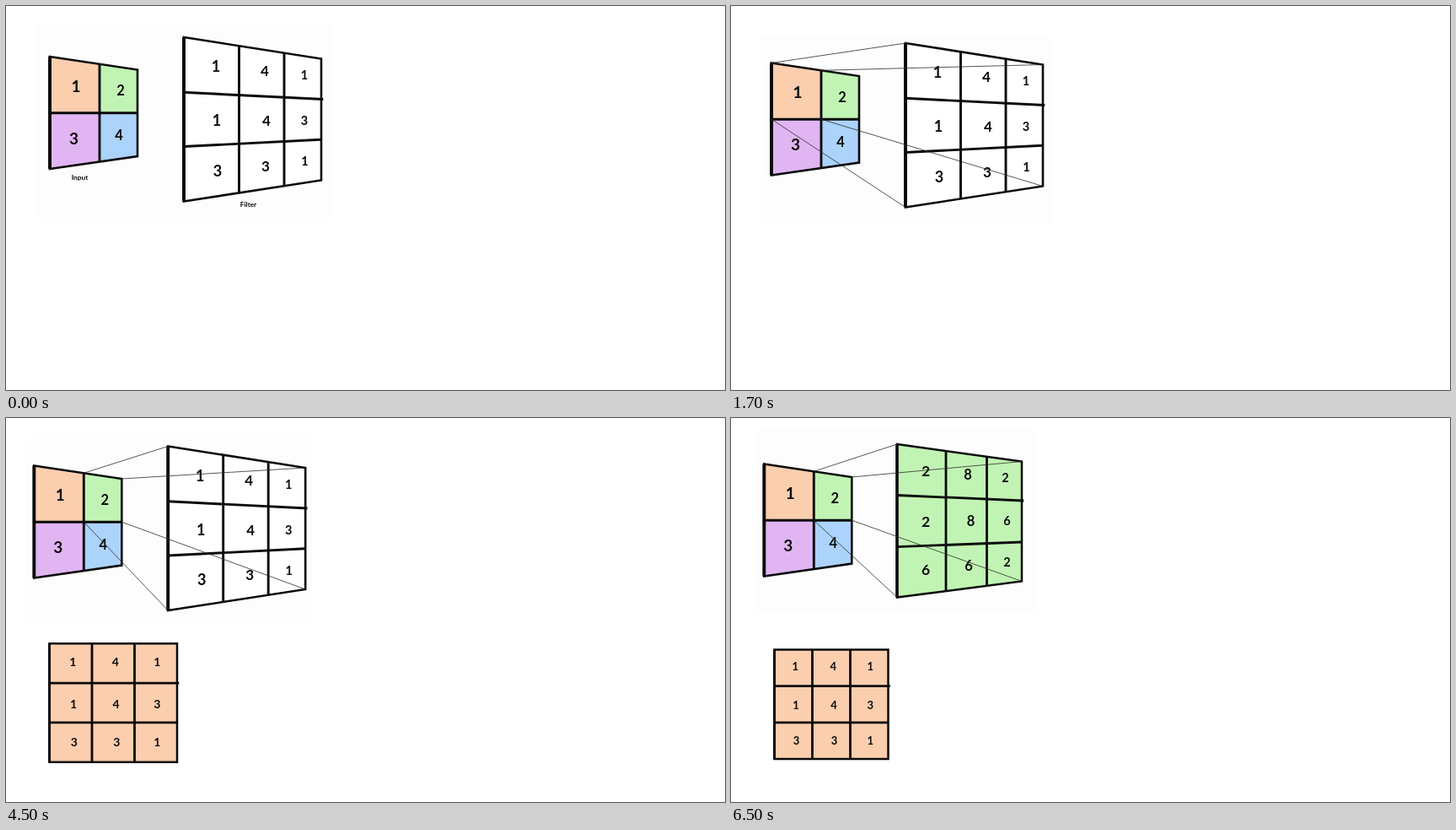
An HTML page that plays this animation: 853x455 px, repeating every 8 s.

```html
<!DOCTYPE html>
<html lang="en">
<head>
<meta charset="utf-8">
<title>Transposed convolution</title>
<style>
  html, body { margin: 0; width: 100%; height: 100%; overflow: hidden; background: #fff; }
  svg { display: block; }
  text { font-family: Lato, "Open Sans", sans-serif; font-weight: 700; text-anchor: middle; fill: #0b0b0b; }
  .edge { stroke: #0a0a0a; fill: none; stroke-miterlimit: 6; }
  .ray { stroke: #2c2c2c; stroke-width: .8; }
</style>
</head>
<body>
<svg id="stage" width="853" height="455" viewBox="0 0 853 455"></svg>
<script>
const NS = 'http://www.w3.org/2000/svg';
const stage = document.getElementById('stage');
const ORANGE = '#fbceae', GREEN = '#c1f4b4', PURPLE = '#e1b5f2', BLUE = '#acd3fc';
const LOOP = 8000;

function add(parent, tag, attrs, content) {
  const el = document.createElementNS(NS, tag);
  for (const key in attrs) el.setAttribute(key, attrs[key]);
  if (content !== undefined) el.textContent = content;
  parent.append(el);
  return el;
}

function line(g, a, b, width, cls = 'edge') {
  const attrs = { x1: a[0], y1: a[1], x2: b[0], y2: b[1], class: cls };
  if (width) attrs['stroke-width'] = width;
  add(g, 'line', attrs);
}

function label(g, x, y, size, content) {
  add(g, 'text', { x, y: y + size * .36, 'font-size': size }, content);
}

// x: column lines; left, right: heights of the row lines at both sides
function gridPoint(grid, col, row) {
  const { x, left, right } = grid;
  const k = (x[col] - x[0]) / (x[x.length - 1] - x[0]);
  return [x[col], left[row] + (right[row] - left[row]) * k];
}

function shift(grid, dx, dy) {
  return {
    ...grid,
    x: grid.x.map(v => v + dx),
    left: grid.left.map(v => v + dy),
    right: grid.right.map(v => v + dy),
    spots: grid.spots.map(([x, y]) => [x + dx, y + dy])
  };
}

function drawGrid(g, grid, digits, fills) {
  const n = grid.x.length - 1;
  const at = (c, r) => gridPoint(grid, c, r);
  const w = grid.weight;
  for (let r = 0; r < n; r++) for (let c = 0; c < n; c++) {
    const corners = [at(c, r), at(c + 1, r), at(c + 1, r + 1), at(c, r + 1)];
    add(g, 'polygon', { points: corners.join(' '), fill: fills[(r * n + c) % fills.length] });
  }
  for (let i = 1; i < n; i++) {
    line(g, at(i, 0), at(i, n), w);
    const [ex, ey] = at(n, i);
    line(g, at(0, i), [ex + (n === 3 && i === 1 ? 2.3 : 0), ey], w);
  }
  const outline = [at(0, 0), at(n, 0), at(n, n), at(0, n)];
  add(g, 'polygon', { points: outline.join(' '), class: 'edge', 'stroke-width': w - .3 });
  line(g, at(0, 0), at(0, n), grid.side);
  grid.spots.forEach(([x, y], i) => label(g, x, y, grid.sizes[i % n], digits[i]));
}

const input = {
  x: [52, 111, 156], left: [60, 126.7, 193], right: [75.5, 126.7, 178],
  weight: 2.9, side: 3.9, sizes: [19, 16.5],
  spots: [[83, 95], [136, 100.5], [80.5, 157], [134, 153.5]]
};

const wide = {
  x: [211, 276.5, 330, 374], left: [37, 102.3, 166.5, 231.5], right: [62.5, 110.5, 158.3, 206.5],
  weight: 2.9, side: 3.9, sizes: [18, 17, 14.5],
  spots: [[249, 72], [307, 77], [354, 82], [250, 136], [309, 136], [354, 136],
          [251, 195.5], [308, 189.5], [354.5, 184]]
};

const small = {
  x: [223.5, 274.5, 317.5, 353.5], left: [50.5, 107.8, 165, 222], right: [70.5, 115, 159.5, 204],
  weight: 2.7, side: 3.3, sizes: [16.5, 15.5, 13],
  spots: [[253, 81], [299, 85], [337.5, 89], [254, 138.5], [300.5, 138.5], [338, 138.5],
          [255, 191.5], [300, 187], [338, 182.5]]
};

const medium = {
  x: [197, 255, 303.5, 345], left: [31, 91.5, 152.7, 212.5], right: [51.5, 98, 147, 193.5],
  weight: 2.8, side: 3.5, sizes: [17.5, 16.5, 14.5],
  spots: [[231, 63], [281, 67.5], [325.5, 71], [231, 122.5], [284.5, 122.5], [327.5, 122],
          [231, 179.5], [282, 175], [327.5, 171]]
};

function flatGrid(top, cell, row, size) {
  const x = [0, 1, 2, 3].map(i => 51.5 + i * cell);
  const y = [0, 1, 2, 3].map(i => top + i * row);
  const spots = [];
  [.46, 1.53, 2.5].forEach((v, r) => [.55, 1.55, 2.53].forEach((u, c) =>
    spots.push([51.5 + cell * (u + (c < 2 ? r * .015 : 0)), top + row * v])));
  return { x, left: y, right: y, weight: 2.8, side: 2.8, sizes: [size, size, size], spots };
}

const ONES = '141143331', TWOS = '282286662';

// from: input column the rays leave; panel: x, y, width, height
const scenes = [
  { start: 0, panel: [38, 20, 348, 231], move: [0, 0], filter: wide, digits: ONES, fill: '#fff',
    captions: [['Input', 87.5, 203.5], ['Filter', 287.5, 235.5]] },
  { start: 500, panel: [36, 36, 344, 221], move: [-4, 7.5], filter: shift(wide, -4, 7), digits: ONES,
    fill: '#fff', from: 0 },
  { start: 2500, panel: [41, 34, 330, 209], move: [2, 11], filter: small, digits: ONES,
    fill: ORANGE, from: 0 },
  { start: 4500, panel: [23, 24, 340, 222], move: [-18.7, -3.5], filter: shift(wide, -18.8, -3.5),
    digits: ONES, fill: '#fff', from: 1, flat: flatGrid(267.3, 50.5, 46.8, 14) },
  { start: 6500, panel: [30, 13, 332, 218], move: [-12.7, -5.5], filter: medium, digits: TWOS,
    fill: GREEN, from: 1, flat: flatGrid(274.5, 45, 43.2, 13) }
];

function build(scene) {
  const g = add(stage, 'g', { visibility: 'hidden' });
  const [x, y, width, height] = scene.panel;
  add(g, 'rect', { x, y, width, height, fill: '#fdfdfd' });
  const source = shift(input, ...scene.move);
  drawGrid(g, source, '1234', [ORANGE, GREEN, PURPLE, BLUE]);
  drawGrid(g, scene.filter, scene.digits, [scene.fill]);
  if (scene.from !== undefined) {
    for (const c of [0, 1]) for (const r of [0, 1]) {
      line(g, gridPoint(source, scene.from + c, r), gridPoint(scene.filter, c * 3, r * 3), 0, 'ray');
    }
  }
  if (scene.flat) drawGrid(g, scene.flat, ONES, [ORANGE]);
  for (const [word, cx, cy] of scene.captions || []) label(g, cx, cy, 8.3, word);
  return g;
}

const layers = scenes.map(build);
let shown = -1;

function draw() {
  const t = performance.now() % LOOP;
  const now = scenes.filter(s => s.start <= t).length - 1;
  if (now !== shown) {
    layers.forEach((g, i) => g.setAttribute('visibility', i === now ? 'visible' : 'hidden'));
    shown = now;
  }
  requestAnimationFrame(draw);
}
draw();
</script>
</body>
</html>
```
